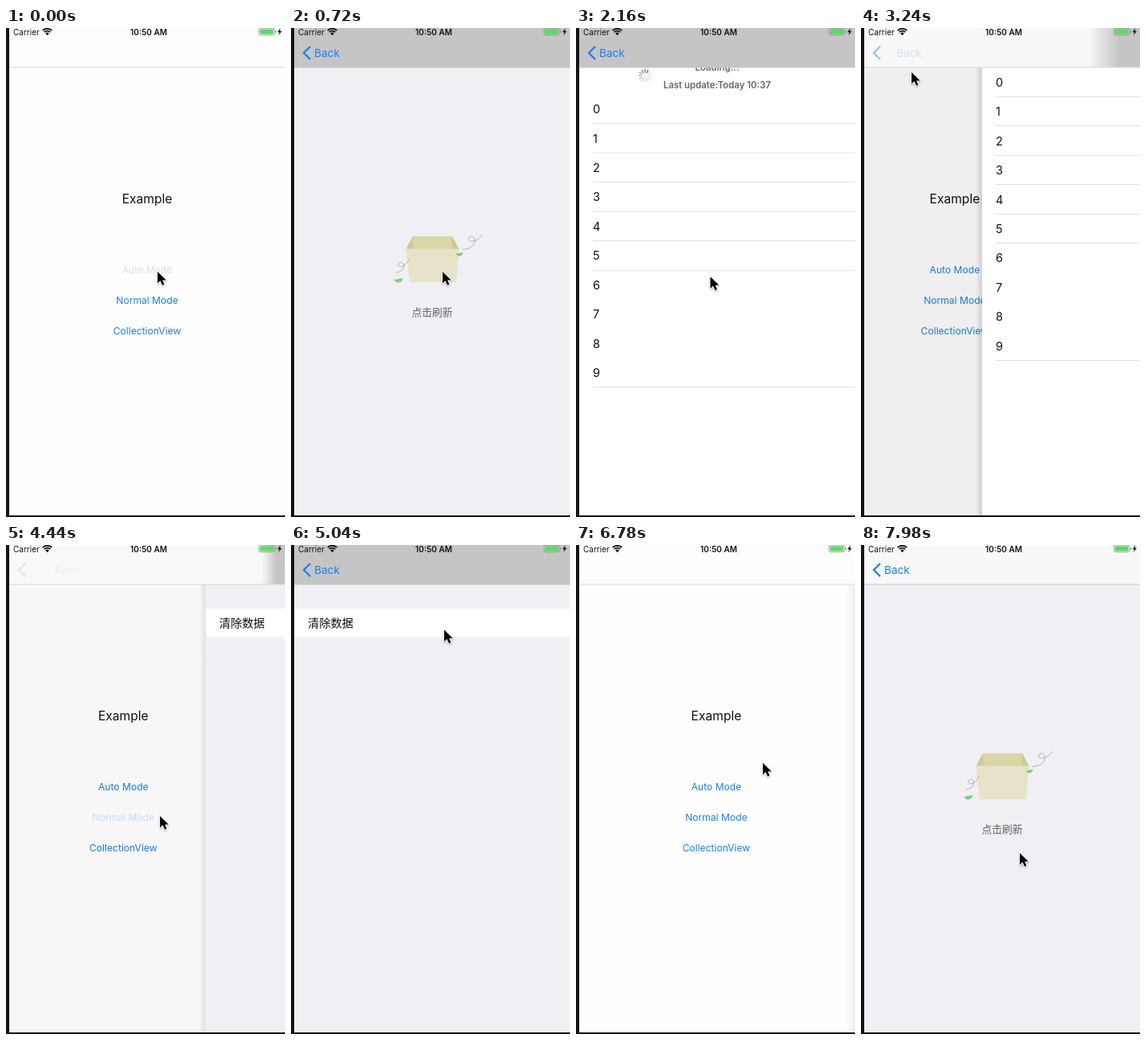
These frames come from a looping animation (348x608 px, 8 s). An HTML page with a canvas:

```html
<!DOCTYPE html>
<html lang="zh-CN">
<head>
<meta charset="utf-8">
<title>Pull to refresh demo</title>
<style>
html, body { margin: 0; width: 100%; height: 100%; overflow: hidden; background: #fff; }
canvas { display: block; width: 348px; height: 608px; }
</style>
</head>
<body>
<canvas id="stage"></canvas>
<script>
const W = 348, H = 608, LEFT = 4, NAV = 49, LOOP = 8000, STEP = 60;
const PAGE_W = W - LEFT, MID = 176;
const SANS = 'Inter, Roboto, sans-serif';
const CJK = '"Noto Sans CJK SC", "Noto Sans CJK", sans-serif';
const BLUE = '#1a80ee', GROUPED = '#efeff4';

const canvas = document.getElementById('stage');
const ctx = canvas.getContext('2d');
const dpr = window.devicePixelRatio || 1;
canvas.width = W * dpr;
canvas.height = H * dpr;

// Each visit to a page: when it slides in and when it slides out.
const visits = [
  { page: 'auto', start: 60, end: 3136, grey: true },
  { page: 'normal', start: 4364, end: 6306, grey: true },
  { page: 'collection', start: 7400, end: Infinity, grey: false }
];
const LOADED = 1740, CLEARED = 5340;

const pointer = [
  [0, 188, 302], [900, 188, 302], [1250, 169, 314], [2100, 169, 314],
  [2820, 44, 27], [3100, 44, 27], [3240, 62, 54], [3960, 191, 336],
  [4600, 191, 336], [5100, 190, 95], [5400, 190, 95], [5940, 44, 21],
  [6260, 44, 21], [6780, 232, 270], [7260, 197, 382], [8000, 197, 382]
];

const clamp = v => Math.max(0, Math.min(1, v));
const smooth = v => { v = clamp(v); return v * v * (3 - 2 * v); };
const ramp = (t, a, b) => smooth((t - a) / (b - a));
const between = (t, a, b) => t >= a && t < b;

function spring(ms) {
  if (ms <= 0) return 0;
  if (ms >= 560) return 1;
  const k = ms * 0.014;
  return 1 - (1 + k) * Math.exp(-k);
}

function rect(x, y, w, h, color) {
  ctx.fillStyle = color;
  ctx.fillRect(x, y, w, h);
}

function poly(color, ...pts) {
  ctx.beginPath();
  for (let i = 0; i < pts.length; i += 2) ctx.lineTo(pts[i], pts[i + 1]);
  ctx.closePath();
  ctx.fillStyle = color;
  ctx.fill();
}

function text(str, x, y, size, color, opt = {}) {
  ctx.font = `${opt.weight || 400} ${size}px ${opt.family || SANS}`;
  ctx.textAlign = opt.align || 'center';
  ctx.fillStyle = color;
  ctx.fillText(str, x, y + size * 0.36);
}

function stroke(path, color, width) {
  ctx.strokeStyle = color;
  ctx.lineWidth = width;
  ctx.stroke(new Path2D(path));
}

function drawHome(t, shift, dim) {
  rect(LEFT, 0, PAGE_W, H, '#fefefe');
  text('Example', MID + shift, 212.5, 15.6, '#111');
  const links = [
    ['Auto Mode', 301, between(t, 0, 640)],
    ['Normal Mode', 339, between(t, 4220, 4960)],
    ['CollectionView', 377, between(t, 7320, 7960)]
  ];
  for (const [label, y, pressed] of links) {
    ctx.globalAlpha = pressed ? 0.22 : 1;
    text(label, MID + shift, y, 12.1, BLUE);
    ctx.globalAlpha = 1;
  }
  if (dim > 0) rect(LEFT, 0, PAGE_W, H, `rgba(0,0,0,${0.1 * dim})`);
}

function drawLeaf(x, y, r) {
  ctx.beginPath();
  ctx.arc(x, y, r, 0.05, Math.PI - 0.35);
  ctx.quadraticCurveTo(x, y + 1, x + r, y);
  ctx.fillStyle = '#7fca7c';
  ctx.fill();
}

function drawEmpty(y) {
  ctx.save();
  ctx.translate(0, y);
  poly('#dad6a8', 152, 259, 201, 259, 209.5, 275, 143.5, 275);
  poly('#cdc997', 152, 259, 152.5, 275, 143.5, 275);
  poly('#cdc997', 201, 259, 209.5, 275, 200.5, 275);
  poly('#e6e3c8', 143.5, 274.5, 209.5, 274.5, 206, 316, 148, 316);
  stroke('M214 275.5C224 275 231 269 229 262C227 257 220 259 221.5 263C223 267 232 266 239 257', '#aaa', 0.9);
  stroke('M131 304C138 303 142 299 140.5 294C139 290 133 291 134 295C135.500 299 143 297 147 287', '#aaa', 0.9);
  drawLeaf(210, 279, 4.5);
  drawLeaf(134, 311, 5.5);
  text('点击刷新', MID, 353, 12.8, '#666', { family: CJK, weight: 500 });
  ctx.restore();
}

function drawSpinner(x, y, t) {
  const head = Math.floor(t / 1000 * 12);
  ctx.lineCap = 'round';
  for (let i = 0; i < 12; i++) {
    const a = i * Math.PI / 6 - Math.PI / 2;
    const age = ((head - i) % 12 + 12) % 12;
    ctx.beginPath();
    ctx.moveTo(x + 4.2 * Math.cos(a), y + 4.2 * Math.sin(a));
    ctx.lineTo(x + 7.8 * Math.cos(a), y + 7.8 * Math.sin(a));
    ctx.strokeStyle = `rgba(100,100,100,${0.9 - Math.min(age, 7) * 0.095})`;
    ctx.lineWidth = 1.4;
    ctx.stroke();
  }
  ctx.lineCap = 'butt';
}

function drawHeader(top, t) {
  rect(LEFT, top, PAGE_W, 45, '#fff');
  text('Loading...', MID, top + 11.5, 11.4, '#666', { weight: 600 });
  text('Last update:Today 10:37', MID, top + 33.5, 11.4, '#666', { weight: 600 });
  drawSpinner(86, top + 22, t);
}

function drawList(y) {
  for (let i = 0; i < 10; i++) {
    const top = NAV + y + i * 36.45;
    text(String(i), 21, top + 18.5, 14.6, '#111', { align: 'left' });
    if (i < 6 || i === 9) rect(21, Math.round(top + 36), W, 1, '#e2e2e4');
  }
}

function drawAuto(t) {
  const pull = 45 * (ramp(t, 1240, 1540) - ramp(t, 2040, 2400));
  const loaded = t >= LOADED;
  rect(LEFT, 0, PAGE_W, H, loaded ? '#fff' : GROUPED);
  if (pull > 0) drawHeader(NAV + pull - 45, t);
  if (loaded) drawList(pull);
  else drawEmpty(pull);
}

function drawNormal(t) {
  rect(LEFT, 0, PAGE_W, H, GROUPED);
  if (t >= CLEARED) return drawEmpty(0);
  rect(LEFT, 79, PAGE_W, 35, between(t, 5220, CLEARED) ? '#d9d9d9' : '#fff');
  text('清除数据', 21, 96.5, 14.2, '#111', { family: CJK, align: 'left' });
}

function drawCollection() {
  rect(LEFT, 0, PAGE_W, H, GROUPED);
  drawEmpty(0);
}

const pages = { auto: drawAuto, normal: drawNormal, collection: drawCollection };

function drawPage(visit, q, t) {
  const shift = (1 - q) * PAGE_W;
  const x = LEFT + shift;
  if (q < 1) {
    const g = ctx.createLinearGradient(x - 8, 0, x, 0);
    g.addColorStop(0, 'rgba(0,0,0,0)');
    g.addColorStop(1, `rgba(0,0,0,${0.05 + 0.15 * q})`);
    rect(x - 8, 0, 8, H, g);
  }
  ctx.save();
  ctx.translate(shift, 0);
  pages[visit.page](t);
  ctx.restore();
}

function drawNav(visit, q, leaving) {
  const tone = Math.round(253 - 5 * clamp(q * 3));
  rect(LEFT, 0, PAGE_W, NAV, `rgb(${tone},${tone},${tone})`);
  if (visit && visit.grey && q > 0) {
    const w = PAGE_W * q ** (leaving ? 3 : 2);
    if (q > 0.995) rect(LEFT, 0, PAGE_W, NAV, '#c5c5c5');
    else {
      const soft = Math.min(40, w * 0.6);
      const g = ctx.createLinearGradient(W - w, 0, W - w + soft + 0.01, 0);
      g.addColorStop(0, 'rgba(197,197,197,0)');
      g.addColorStop(1, '#c5c5c5');
      rect(W - w, 0, w, NAV, g);
    }
  }
  rect(LEFT, NAV - 0.5, PAGE_W, 1, q > 0.9 ? '#c9c9ce' : '#d8d8d8');
  if (q <= 0.01) return;
  ctx.globalAlpha = q ** 1.5;
  stroke('M24 23L16 31L24 39', BLUE, 2.3);
  ctx.globalAlpha = q ** (leaving ? 3 : 2);
  text('Back', 29 + (1 - q) * (leaving ? 35 : 45), 31, 13.6, BLUE, { align: 'left' });
  ctx.globalAlpha = 1;
}

function drawStatus() {
  text('Carrier', 9, 5, 10, '#111', { align: 'left' });
  text('10:50 AM', 178, 5, 10, '#111', { weight: 600 });
  for (const r of [8.2, 5.4]) {
    ctx.beginPath();
    ctx.arc(51.5, 9, r, -Math.PI * 0.75, -Math.PI * 0.25);
    ctx.strokeStyle = '#111';
    ctx.lineWidth = 1.7;
    ctx.stroke();
  }
  ctx.beginPath();
  ctx.moveTo(51.5, 9.3);
  ctx.arc(51.5, 9, 3.2, -Math.PI * 0.75, -Math.PI * 0.25);
  ctx.fillStyle = '#111';
  ctx.fill();

  ctx.beginPath();
  ctx.roundRect(315.5, 0.2, 19.5, 8.6, 2);
  ctx.strokeStyle = '#8f948f';
  ctx.lineWidth = 0.8;
  ctx.stroke();
  rect(316.8, 1.4, 16.8, 6.2, '#5fd865');
  rect(335.8, 3, 1.2, 3, '#8f948f');
  poly('#111', 342.5, 0, 338.500, 5.2, 341, 5.2, 339.8, 9.2, 344, 3.8, 341.5, 3.8);
}

function drawPointer(t) {
  let i = 0;
  while (i < pointer.length - 2 && t >= pointer[i + 1][0]) i++;
  const [t0, x0, y0] = pointer[i], [t1, x1, y1] = pointer[i + 1];
  const k = ramp(t, t0, t1);
  ctx.save();
  ctx.translate(x0 + (x1 - x0) * k, y0 + (y1 - y0) * k);
  const arrow = new Path2D('M1 1V15.5L4.500 12.300L7 17.800L9.500 16.700L7.200 11.500H11.800Z');
  ctx.shadowColor = 'rgba(0,0,0,0.3)';
  ctx.shadowBlur = 2 * dpr;
  ctx.shadowOffsetY = dpr;
  ctx.lineJoin = 'round';
  ctx.strokeStyle = '#fff';
  ctx.lineWidth = 2;
  ctx.stroke(arrow);
  ctx.shadowColor = 'transparent';
  ctx.fillStyle = '#000';
  ctx.fill(arrow);
  ctx.restore();
}

function draw(t) {
  ctx.setTransform(dpr, 0, 0, dpr, 0, 0);
  ctx.clearRect(0, 0, W, H);
  const visit = visits.filter(v => t >= v.start).pop();
  const leaving = Boolean(visit && t >= visit.end);
  let q = 0;
  if (visit) q = leaving ? 1 - spring(t - visit.end) : spring(t - visit.start);

  if (q < 1) drawHome(t, -0.3 * PAGE_W * q, q);
  if (q > 0) drawPage(visit, q, t);
  drawNav(visit, q, leaving);
  drawStatus();
  rect(0, 0, LEFT, H, '#141414');
  rect(0, H - 2, W, 2, '#141414');
  drawPointer(t);
}

function tick() {
  const t = performance.now() % LOOP;
  draw(Math.floor(t / STEP) * STEP);
  requestAnimationFrame(tick);
}
tick();
</script>
</body>
</html>
```
